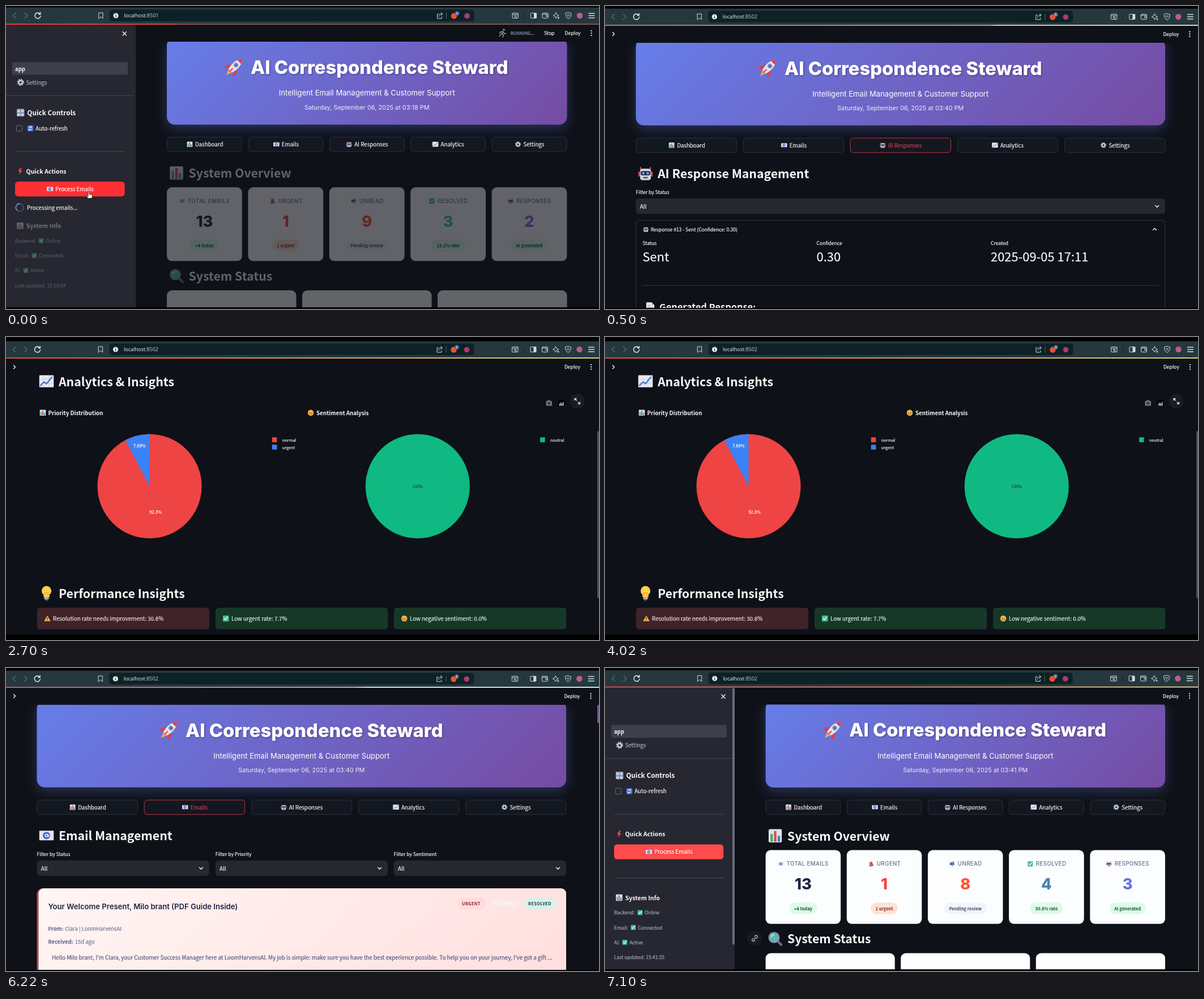
Write an HTML page that moves like this. It is 1047 by 535 pixels and loops after 8 s.

```html
<!DOCTYPE html>
<html lang="en">
<head>
<meta charset="utf-8">
<title>Mail dashboard</title>
<style>
html, body { margin: 0; width: 100%; height: 100%; overflow: hidden; background: #000; }
svg { position: absolute; left: 0; top: 0; width: 1047px; height: 535px; display: block; }
text { font-family: "Noto Sans CJK JP", "Noto Sans CJK SC", "Noto Sans CJK", "Noto Sans", sans-serif; fill: #fafafa; white-space: pre; }
.inter { font-family: Inter, sans-serif; }
.url { font-family: "Open Sans", sans-serif; }
.b { font-weight: 700; stroke: none !important; }
.mid { text-anchor: middle; }
.line { fill: none; stroke-linecap: round; stroke-linejoin: round; }
</style>
</head>
<body>
<svg id="stage" viewBox="0 0 1047 535"></svg>
<script>
const BG = '#0e1117', PANEL = '#262730', EDGE = '#343741';
const LATIN = 0.8955; // Latin letters in this face are drawn larger than their nominal size

const rect = (x, y, w, h, fill, r = 0, more = '') =>
  `<rect x="${x}" y="${y}" width="${w}" height="${h}" rx="${r}" fill="${fill}" ${more}/>`;
const disc = (x, y, r, fill, more = '') => `<circle cx="${x}" cy="${y}" r="${r}" fill="${fill}" ${more}/>`;
const line = (d, color, w = 1, more = '') =>
  `<path class="line" d="${d}" stroke="${color}" stroke-width="${w}" ${more}/>`;
const shape = (d, fill) => `<path d="${d}" fill="${fill}"/>`;
const esc = s => s.replace(/&/g, '&amp;');
// Regular text gets a hairline outline, giving the slightly heavy look of screen rendering
const text = (x, y, size, s, fill = '#fafafa', cls = '', more = '') =>
  `<text x="${x}" y="${y}" font-size="${(size * LATIN).toFixed(2)}" class="${cls}" style="fill:${fill};stroke:${fill};stroke-width:.18" ${more}>${esc(s)}</text>`;
const inter = (x, y, size, weight, s, fill = '#fff', cls = '', more = '') =>
  `<text x="${x}" y="${y}" font-size="${size}" font-weight="${weight}" class="inter ${cls}" style="fill:${fill}" ${more}>${esc(s)}</text>`;
const group = (s, more) => `<g ${more}>${s}</g>`;

// Small pictures, each in a 24 x 24 box
const icons = {
  chart: rect(1, 1, 22, 22, '#dce3ea', 2) + rect(4, 9, 4, 13, '#3fae7c') + rect(10, 4, 4, 18, '#e4493f') +
    rect(16, 12, 4, 10, '#3f7fd6'),
  mail: rect(0, 4, 24, 16, '#e6dfe6', 1) + disc(12, 12, 6, '#3c6ad6') +
    disc(12, 12, 2.2, 'none', 'stroke="#fff" stroke-width="1.3"') + line('M14.3 10v3q1.5 1.5 2-1', '#fff', 1.1),
  robot: rect(0, 9, 3, 8, '#d8434a', 1) + rect(21, 9, 3, 8, '#d8434a', 1) + line('M4 2v5M20 2v5', '#d8434a', 2) +
    rect(3, 4, 18, 19, '#cfd3de', 4) + rect(4, 8, 16, 7, '#27304a', 2) + disc(8.3, 11.5, 2, '#6db5ff') +
    disc(15.7, 11.5, 2, '#6db5ff') + rect(8, 17.5, 8, 2.5, '#4d5468', 1),
  trend: rect(0, 2, 24, 20, '#e9e9f1', 1) + line('M0 8.5h24M0 15h24M8 2v20M16 2v20', '#c3c8d8', .7) +
    line('M2 19l6-6 4 3 9-11', '#4479cf', 2.2),
  gear: disc(12, 12, 9.5, 'none', 'stroke="#c3cbda" stroke-width="4" stroke-dasharray="4 3.46"') +
    disc(12, 12, 6, 'none', 'stroke="#c3cbda" stroke-width="5"'),
  check: rect(1, 1, 22, 22, '#45bda0', 2) + line('M6 12l4 5 8-10', '#fff', 3),
  siren: group(shape('M5 17V10a7 7 0 0 1 14 0v7z', '#e8414a') + rect(3, 17, 18, 5, '#5d6680', 1) +
    rect(8, 8, 3, 7, '#ffb0a5', 1), 'transform="rotate(-12 12 12)"'),
  box: shape('M2 9q0-4 4-4h11q5 0 5 5v7H2z', '#5d86cc') + rect(4, 8, 5, 9, '#34548e', 2) +
    rect(11, 17, 3, 6, '#78665d') + line('M15 11V2h5', '#e8414a', 2.2),
  dials: rect(0, 0, 24, 24, '#8d9bb5', 3) + [6, 18].map(x => [6, 18].map(y =>
    disc(x, y, 4, '#e4e8f0') + line(`M${x} ${y - 3}v3`, '#59657e', 1.5)).join('')).join(''),
  cycle: rect(0, 0, 24, 24, '#4a6be0', 3) +
    line('M6 11a6 6 0 0 1 11-3M18 13a6 6 0 0 1-11 3M17 4v4h-4M7 20v-4h4', '#fff', 2.3),
  bolt: shape('M14 0L5 13h6L8 24l11-14h-6l4-10z', '#ff5145'),
  lens: line('M16 16l6 6', '#6a6794', 4) + disc(10, 10, 8.2, '#58b9ae', 'stroke="#8d8ea8" stroke-width="2.4"') +
    line('M5.5 9a5 5 0 0 1 4-4', '#bdeae2', 1.6),
  memo: shape('M3 1h12l6 6v16H3z', '#e8ebf2') + shape('M15 1v6h6z', '#aab2c4') +
    line('M6 8h6M6 12h11M6 16h11M6 20h8', '#8490a8', 1.2),
  smile: disc(12, 12, 11, '#ffbd4a') + line('M6 10q2-3 4 0M14 10q2-3 4 0', '#5c3420', 1.7) +
    line('M6 14q6 7 12 0', '#5c3420', 2) + disc(4.5, 13, 2, '#ff7d5c') + disc(19.5, 13, 2, '#ff7d5c'),
  warn: shape('M12 1L24 22H0z', '#f5b83d') + line('M12 8v7M12 18.6v.2', '#3a2d20', 2.4),
  bulb: shape('M12 0a8 8 0 0 1 5 14.2V18H7v-3.8A8 8 0 0 1 12 0z', '#ffcf52') + rect(8, 18, 8, 4, '#a9afba', 1) +
    rect(10, 22, 4, 2, '#7b818d', 1) + line('M10 16l-1-6 3 2 3-2-1 6', '#f59a2e', 1.1),
  rocket: group(shape('M9 19h6l-3 8z', '#ffae42') + shape('M7 11l-4 6v5l5-4zM17 11l4 6v5l-5-4z', '#d8434a') +
    shape('M12-4C18 2 17.5 12 15.5 19h-7C6.500 12 6 2 12-4z', '#e4e2ea') +
    shape('M12-4q3 3 3.800 6H8.200Q9-1 12-4z', '#d8434a') +
    disc(12, 8, 2.6, '#4a78c8', 'stroke="#8890a4" stroke-width="1"') + rect(11.200, 14, 1.6, 7, '#d8434a', .8),
    'transform="rotate(45 12 12)"')
};
const icon = (name, cx, cy, size) =>
  group(icons[name], `transform="translate(${cx - size / 2} ${cy - size / 2}) scale(${size / 24})"`);

// Gradient running at 135 degrees across a box
const diagonal = (id, x, y, w, h, a, b) => {
  const cx = x + w / 2, cy = y + h / 2, d = (w + h) / 4;
  return `<linearGradient id="${id}" gradientUnits="userSpaceOnUse" x1="${cx - d}" y1="${cy - d}" x2="${cx + d}" y2="${cy + d}">` +
    `<stop stop-color="${a}"/><stop offset="1" stop-color="${b}"/></linearGradient>`;
};

function browserBar(id, port, dx, dy, stops) {
  const ink = '#d5dcde', dim = '#5d6e73';
  const marks = stops.map(([at, c]) => `<stop offset="${at}" stop-color="${c}"/>`).join('');
  return group(
    rect(-5, -20, 1070, 23, '#000') + rect(-5, 2.6, 1070, 29, '#25383d') +
    `<linearGradient id="${id}">${marks}</linearGradient>` + rect(-5, 31.2, 1070, 1.8, `url(#${id})`) +
    line('M17.500 12.500l-5 4.500 5 4.500', dim, 1.2) + line('M33 12.500l5 4.500-5 4.500', dim, 1.2) +
    line('M60 14a5 5 0 1 0 1 3.500M60.800 11.500v3h-3', '#eef2f3', 1.4) +
    line('M164 12h7v10l-3.500-3-3.500 3z', ink) +
    rect(183, 6.5, 644, 20.5, '#0d2227', 5) +
    disc(194, 17, 4.6, '#e8edee') + line('M194 16.500v2.800M194 14.600v.1', '#0d2227', 1.2) +
    `<text class="url" x="208.500" y="20.300" font-size="9.05">localhost<tspan fill-opacity=".8">:${port}</tspan></text>` +
    line('M764.500 14h-3v8h8v-3M764.500 18.500q.5-4.500 5.500-4.500M768 11.500l3 2.500-3 2.500', ink) +
    line('M777.500 12v10', '#50646a') +
    disc(791, 17.5, 5.2, '#f0502f') + disc(796.5, 13, 3.8, '#65659a') +
    text(796.5, 15.2, 6, '1', '#fff', 'mid') + disc(814, 17.5, 4.8, '#b8356b') +
    rect(894, 12.5, 10.5, 9, 'none', 1, `stroke="${ink}"`) + line('M894 15h10.500M900.500 19l1.500 1.500', ink) +
    disc(899.5, 18, 1.5, 'none', `stroke="${ink}"`) + line('M915 12v10', '#14262b') +
    rect(926.500, 12.500, 10, 9, 'none', 1, `stroke="${ink}"`) + rect(932, 12.500, 4.500, 9, ink) +
    rect(947, 12.500, 10, 9, 'none', 1.500, `stroke="${ink}"`) + line('M947 14.500h8M957 16h-3.500v2.500h3.500', ink) +
    line('M971 12q.8 4.200 5 5-4.200.8-5 5-.8-4.200-5-5 4.200-.8 5-5M975.500 19.500v3M974 21h3', ink) +
    line('M993 11.500l5 1.500q.5 6.500-5 9.500-5.500-3-5-9.500z', ink) +
    line('M990.500 16q2.500-2 5 0M991.700 17.800q1.300-1 2.600 0', ink, .9) +
    disc(1013, 17, 5.2, '#c05a8c') +
    line('M1029 13h10M1029 17h10M1029 21h10', ink, 1.3), `transform="translate(${dx} ${dy})"`);
}

const deploy = (x, y) => text(x, y, 9.54, 'Deploy') +
  [-4, 0, 4].map(d => disc(x + 47, y - 3.5 + d, 1.15, '#fafafa')).join('');

function banner(id, x, w, top, bottom, date, titleX) {
  const y = top - 7, h = bottom - y, cx = x + w / 2;
  return diagonal(id, x, y, w, h, '#667eea', '#764ba2') +
    rect(x, y + 7, w, h, '#667eea', 14, 'opacity=".3" filter="url(#glow)"') +
    rect(x, y, w, h, `url(#${id})`, 14) +
    icon('rocket', titleX - 29.5, top + 45, 31) +
    inter(titleX, top + 57, 32.7, 800, 'AI Correspondence Steward', '#fff', '', 'filter="url(#soft)"') +
    inter(cx, top + 95.3, 13.1, 400, 'Intelligent Email Management & Customer Support', '#fff', 'mid') +
    inter(cx, top + 119.7, 10.9, 400, date, '#eeecfa', 'mid');
}

const tabs = [['chart', 'Dashboard', 16.5], ['mail', 'Emails', 7], ['robot', 'AI Responses', 22],
  ['trend', 'Analytics', 13], ['gear', 'Settings', 10.5]];
const tabRow = (x, step, w, y, active) => tabs.map(([pic, name, back], i) => {
  const left = x + i * step, on = i === active, tx = left + w / 2 - back;
  return rect(left + .5, y + .4, w - 1, 25.6, '#131720', 5, `stroke="${on ? '#d64052' : EDGE}" stroke-width=".85"`) +
    icon(pic, tx - 9.5, y + 13, 10.5) + text(tx, y + 17, 10.9, name, on ? '#cf4059' : '#fafafa');
}).join('');

const heading = (pic, x, y, s) => icon(pic, x + 13, y - 8.5, 25.5) + text(x + 34.5, y, 23.7, s, '#fafafa', 'b');
const select = (x, w, label) => text(x, 332.3, 9.54, 'Filter by ' + label) + rect(x, 340, w, 27, PANEL, 5.5) +
  text(x + 7.3, 357.5, 10.9, 'All') + line(`M${x + w - 17.3} 352.300l3 3 3-3`, '#fafafa', 1.4);
const screen = (end, s) => rect(-5, 0, 1070, 600, BG) + s + rect(-5, end, 1070, 80, '#000');

function sidebar(o) {
  const info = [['Backend:', 'Online', 46], ['Email:', 'Connected', 34], ['AI:', 'Active', 19]];
  const soft = '#a9adbd', y0 = o.infoY;
  const facts = icon('chart', 25, y0 - 4.3, 12.5) + text(35.8, y0, 11.8, 'System Info', '#fafafa', 'b') +
    info.map(([k, v, at], i) => {
      const y = y0 + 25.7 + i * 26.2;
      return text(16, y, 9.54, k, soft) + icon('check', 16 + at, y - 3.6, 9.5) + text(24 + at, y, 9.54, v, soft);
    }).join('') + text(16, y0 + 104.3, 9.54, 'Last updated: ' + o.clock, soft);
  return rect(-5, 33, 234.3, 560, PANEL) +
    line('M206 45.500l6.500 6.500M212.500 45.500l-6.500 6.500', '#fafafa', 1.3) +
    rect(11, 99, 204, 22.5, '#3d3f4b', 3) + text(16, 114.5, 10.7, 'app', '#fafafa', 'b') +
    icon('gear', 25.8, 134.8, 13) + text(35.5, 138.8, 10.9, 'Settings', '#b5b7c3') +
    rect(0, 157.7, 226, 1, '#464852') +
    icon('dials', 25.7, 188.3, 13.5) + text(37.3, 193, 13.2, 'Quick Controls', '#fafafa', 'b') +
    rect(18.5, 211, 10, 10, 'none', 1.5, 'stroke="#6c6e79"') +
    icon('cycle', 43, 216, 10.5) + text(52.3, 219.8, 10.9, 'Auto-refresh') +
    rect(16, 256.3, 193.5, 1, '#464852') +
    icon('bolt', 25, 291.5, 12.5) + text(35.5, 295.8, 11.8, 'Quick Actions', '#fafafa', 'b') +
    rect(16, 310, 193.5, 26.3, o.busy ? '#ff3034' : '#ff4b4b', 5.5) +
    icon('mail', 77.5, 323.2, 11) + text(87.3, 327, 10.9, 'Process Emails', '#fff') +
    (o.busy
      ? disc(24, 355.8, 6.7, 'none', 'stroke="#555863" stroke-width="1.6"') +
        line('M24 349.100a6.700 6.700 0 0 0 -4.700 11.400', '#7f88d8', 1.6) +
        text(37, 359.8, 10.9, 'Processing emails...')
      : rect(16, 368.5, 193.5, 1, '#464852') + rect(225.3, 34, 4, 453, '#696e7d', 2)) +
    group(facts, `opacity="${o.fade}"`);
}

function metric(i, [pic, label, tx, value, color, note, nw, fill, ink]) {
  const x = 284 + i * 143.4, cx = x + 66.4;
  return rect(x, 320, 132.8, 130.3, '#fcfdfe', 9) +
    icon(pic, tx - 10, 344.3, 10) + inter(tx, 347.8, 9.8, 500, label, '#64708f', '', 'letter-spacing=".34"') +
    inter(cx, 390, 27.3, 800, value, color, 'mid') +
    rect(cx - nw / 2, 412.8, nw, 20.2, fill, 10) + text(cx, 426.2, 8.5, note, ink, 'b mid');
}

function dashboard(id, o) {
  const cards = [
    ['mail', 'TOTAL EMAILS', 321, '13', '#1b2440', '+4 today', 50, '#dcfce7', '#1d5138'],
    ['siren', 'URGENT', 480.5, '1', '#f8433f', '1 urgent', 48, '#fde3d0', '#8f2338'],
    ['box', 'UNREAD', 623.8, o.unread, '#ff5530', 'Pending review', 75, '#f1f4fa', '#454d66'],
    ['check', 'RESOLVED', 762, o.solved, o.solvedInk, o.rate + '% rate', 58, '#dcfce7', '#1d5138'],
    ['robot', 'RESPONSES', 901, o.replies, o.repliesInk, 'AI generated', 64, '#dcfce7', '#1d5138']];
  const body = heading('chart', 288, 303.3, 'System Overview') + cards.map((c, i) => metric(i, c)).join('') +
    heading('lens', 288, 485, 'System Status') +
    [284, 523, 762].map(x => rect(x, 502, 228.5, 60, '#fff', 9)).join('');
  const status = o.busy
    ? disc(879, 42, 1.8, '#8f929b') + line('M877.500 45l-2.500 4 3.500 2-1.500 4M875 49.500l-4 4M877 45l-4.500 1-1 2.500M878 46l2 3 2.500-.5', '#8f929b', 1.6) +
      text(890.8, 51.4, 8.9, 'RUNNING...', '#9a9db8') + text(950, 51.3, 9.54, 'Stop')
    : disc(264.8, 475.8, 13, '#171a22') +
      line('M263.500 477.500l3-3M264.500 472.500l1.500-1.500q1.800-1 3 .3t.2 2.900l-1.500 1.500M265 479l-1.500 1.500q-1.800 1-3-.3t-.2-2.900l1.500-1.500', '#d8dae0', 1.1);
  const hand = 'M145 339.500l-2.200-3.300q-.4-1.700 1.200-1.200l1.200 1.200v-7.200q1-1.500 2 0v3.800q1.300-.8 1.900.3 1.300-.5 1.700.5 1.300-.3 1.400 1v2.400l-1 2.500z';
  return screen(532, group(
    banner(id + 'b', 284, 706.5, 63, 209.5, o.date, 432) +
    tabRow(284, 143.4, 132.8, 231.2, -1) + group(body, `opacity="${o.fade}"`) +
    rect(229, 33, 830, 30, BG) + status + deploy(986.6, 51.3) + sidebar(o) +
    browserBar(id + 'l', o.port, 0, 0, o.stops) +
    (o.busy ? `<path d="${hand}" fill="#fff" stroke="#222" stroke-width=".7"/>` : ''), `transform="${o.move}"`));
}

// Pages with the side panel closed
const wide = (id, active, stops, body) => screen(533,
  banner(id + 'b', 54.5, 934.5, 64.7, 210.8, 'Saturday, September 06, 2025 at 03:40 PM', 317) +
  tabRow(54.5, 189.1, 178.3, 232.7, active) + body +
  rect(0, 34, 1047, 31, BG) + line('M13.500 46.500l3 3-3 3', '#fafafa', 1.4) + deploy(985.4, 53) +
  browserBar(id + 'l', 8502, -.7, 2, stops));

const field = (x, k, v) => text(x, 422.2, 9.54, k) + text(x, 451.3, 24.5, v);
const responses = () => wide('r', 2, [[0, '#cf7680'], [.4, '#d08a8e'], [.64, '#cf9c98'], [.65, '#ecd0c4'], [1, '#f4e2d6']],
  heading('robot', 58.5, 304.3, 'AI Response Management') + select(54.5, 934.5, 'Status') +
  rect(55, 378.5, 933.5, 220, 'none', 5.5, `stroke="${EDGE}"`) +
  icon('robot', 72.2, 394.3, 10) + text(80.8, 397.7, 9.54, 'Response #13 - Sent (Confidence: 0.30)') +
  line('M967.500 395.500l3-3 3 3', '#fafafa', 1.4) +
  field(66.3, 'Status', 'Sent') + field(373.6, 'Confidence', '0.30') + field(681, 'Created', '2025-09-05 17:11') +
  rect(66, 492.8, 912, 1, EDGE) +
  icon('memo', 80, 532, 19) + text(96, 538.3, 18.3, 'Generated Response:', '#fafafa', 'b'));

const badge = (x, w, fill, tx, s, ink) => rect(x, 405.5, w, 20.5, fill, 10) +
  text(tx, 418.8, 8.2, s, ink, 'b', 'letter-spacing=".4"');
const inbox = () => wide('i', 1, [[0, '#c3656f'], [.58, '#dca5a5'], [.6, '#f0e6e4'], [1, '#f4f2f0']],
  heading('mail', 58.5, 304.3, 'Email Management') +
  select(54.5, 304.3, 'Status') + select(369.7, 304.3, 'Priority') + select(684.7, 304.3, 'Sentiment') +
  diagonal('card', 54.5, 389, 934.5, 150, '#fff6f4', '#ffdfde') +
  rect(54.5, 389, 60, 200, '#b84a5e', 10) + rect(57.5, 389, 931.5, 200, 'url(#card)', 9) +
  inter(74.5, 425.6, 13.1, 600, 'Your Welcome Present, Milo brant (PDF Guide Inside)', '#1e2443') +
  badge(797, 50, '#fbdcdc', 805, 'URGENT', '#8c1f35') + badge(853.5, 54, '#fde7e6', 861.5, 'NEUTRAL', '#fff8f8') +
  badge(914, 58.5, '#d8f1ea', 922, 'RESOLVED', '#20394d') +
  text(74.5, 464.2, 10.4, 'From:', '#585f8c', 'b') + text(104, 464.2, 10.6, 'Clara | LoomHarvensAI', '#6b7197') +
  text(74.5, 487, 10.4, 'Received:', '#585f8c', 'b') + text(121.7, 487, 10.6, '15d ago', '#6b7197') +
  text(81, 515, 10.9, "Hello Milo brant, I'm Clara, your Customer Success Manager here at LoomHarvensAI. My job is simple: make sure you have the best experience possible. To help you on your journey, I've got a gift ...", '#4b5280') +
  rect(1044, 65, 3, 32, '#6c5c98', 1.5));

function analytics() {
  const r = 92, cx = 253.5, cy = 263.5, a = 2 * Math.PI / 13;
  const slice = `M${cx} ${cy}V${cy - r}A${r} ${r} 0 0 0 ${cx - r * Math.sin(a)} ${cy - r * Math.cos(a)}Z`;
  const legend = (x, y, c, s) => rect(x, y, 8.6, 8.6, c) + text(x + 18, y + 7.6, 8.2, s, '#f2f2f5');
  const note = (x, fill, pic, s, ink) => rect(x, 478, 304.3, 38, fill, 5.5) + icon(pic, x + 18.2, 497, 11.5) +
    text(x + 28, 500.7, 10.9, s, ink);
  const green = '#173828', pale = '#e2fbea';
  return screen(525.5,
    line('M13.500 50l3 3-3 3', '#fafafa', 1.4) + deploy(986, 56.3) +
    heading('trend', 58.5, 86.7, 'Analytics & Insights') +
    rect(953.5, 113, 10.5, 8.5, '#73767f', 1.5) + rect(956.5, 111.5, 4.5, 2, '#73767f') + disc(958.7, 117.2, 2.4, BG) +
    disc(958.7, 117.2, 1.3, '#73767f') + rect(975, 111.5, 11, 11, '#000') +
    line('M977.500 121v-3M979.600 121v-5M981.700 121v-3.500M983.800 121v-6', '#fff', 1.2) +
    disc(1008.7, 113.3, 13.2, '#1a1c24') +
    line('M1007.500 112l-3-3M1004 112v-3.300h3.300M1010 115l3 3M1013.500 114.800v3.300h-3.300', '#e4e5ea', 1.2) +
    icon('chart', 65, 133.8, 11.5) + text(74.5, 138, 10.9, 'Priority Distribution', '#fafafa', 'b') +
    icon('smile', 538, 133.8, 11.5) + text(548, 138, 10.9, 'Sentiment Analysis', '#fafafa', 'b') +
    disc(cx, cy, r, '#ef4444') + shape(slice, '#3b82f6') +
    text(235.7, 194.7, 7.9, '7.69%', '#fff', 'b mid') + text(264, 311.7, 7.9, '92.3%', '#fff', 'b mid') +
    legend(469.7, 177.2, '#ef4444', 'normal') + legend(469.7, 190.2, '#3b82f6', 'urgent') +
    disc(726.8, cy, r, '#10b981') + text(726.8, 266.7, 8.2, '100%', '#2a4252', 'mid') +
    legend(943, 177.2, '#10b981', 'neutral') +
    heading('bulb', 58.5, 461, 'Performance Insights') +
    note(54.8, '#3e2328', 'warn', 'Resolution rate needs improvement: 30.8%', '#ffe6e4') +
    note(370, green, 'check', 'Low urgent rate: 7.7%', pale) +
    note(685, green, 'smile', 'Low negative sentiment: 0.0%', pale) +
    rect(1044, 166, 3, 295, '#50525b', 1.5) +
    browserBar('al', 8502, -.5, 5, [[0, '#ff4b4b'], [.5, '#ffa060'], [1, '#f6ec70']]));
}

const scenes = [
  [0, dashboard('p', { busy: true, fade: .35, port: 8501, move: 'translate(0 0)', infoY: 392.3, clock: '15:18:04',
    date: 'Saturday, September 06, 2025 at 03:18 PM', unread: '9', solved: '3', solvedInk: '#3fc0b8', rate: '23.1',
    replies: '2', repliesInk: '#8468f5', stops: [[0, '#ff3d3d'], [.28, '#e84a48'], [.29, '#9c5551'], [1, '#84605a']] })],
  [500, responses()],
  [2700, analytics()],
  [4900, inbox()],
  [7100, dashboard('q', { busy: false, fade: 1, port: 8502, move: 'matrix(.9985 0 0 1 0 1.5)', infoY: 408.3, clock: '15:41:55',
    date: 'Saturday, September 06, 2025 at 03:41 PM', unread: '8', solved: '4', solvedInk: '#4a80b8', rate: '30.8',
    replies: '3', repliesInk: '#686ede', stops: [[0, '#e4504f'], [.5, '#dd8668'], [1, '#ecd39c']] })]
];
const LOOP = 8000;

const stage = document.getElementById('stage');
stage.innerHTML = `<defs>
  <filter id="glow" x="-10%" y="-40%" width="120%" height="180%"><feGaussianBlur stdDeviation="11"/></filter>
  <filter id="soft" x="-5%" y="-20%" width="110%" height="150%"><feDropShadow dx="1.4" dy="1.4" stdDeviation="1.4" flood-color="#000" flood-opacity=".32"/></filter>
</defs>` + scenes.map(([, s]) => `<g class="scene" visibility="hidden">${s}</g>`).join('');
const views = [...stage.querySelectorAll('.scene')];

let shown = -1;
function draw() {
  const t = performance.now() % LOOP;
  const now = scenes.findLastIndex(([start]) => t >= start);
  if (now !== shown) {
    views.forEach((v, i) => v.setAttribute('visibility', i === now ? 'visible' : 'hidden'));
    shown = now;
  }
  requestAnimationFrame(draw);
}
draw();
</script>
</body>
</html>
```
